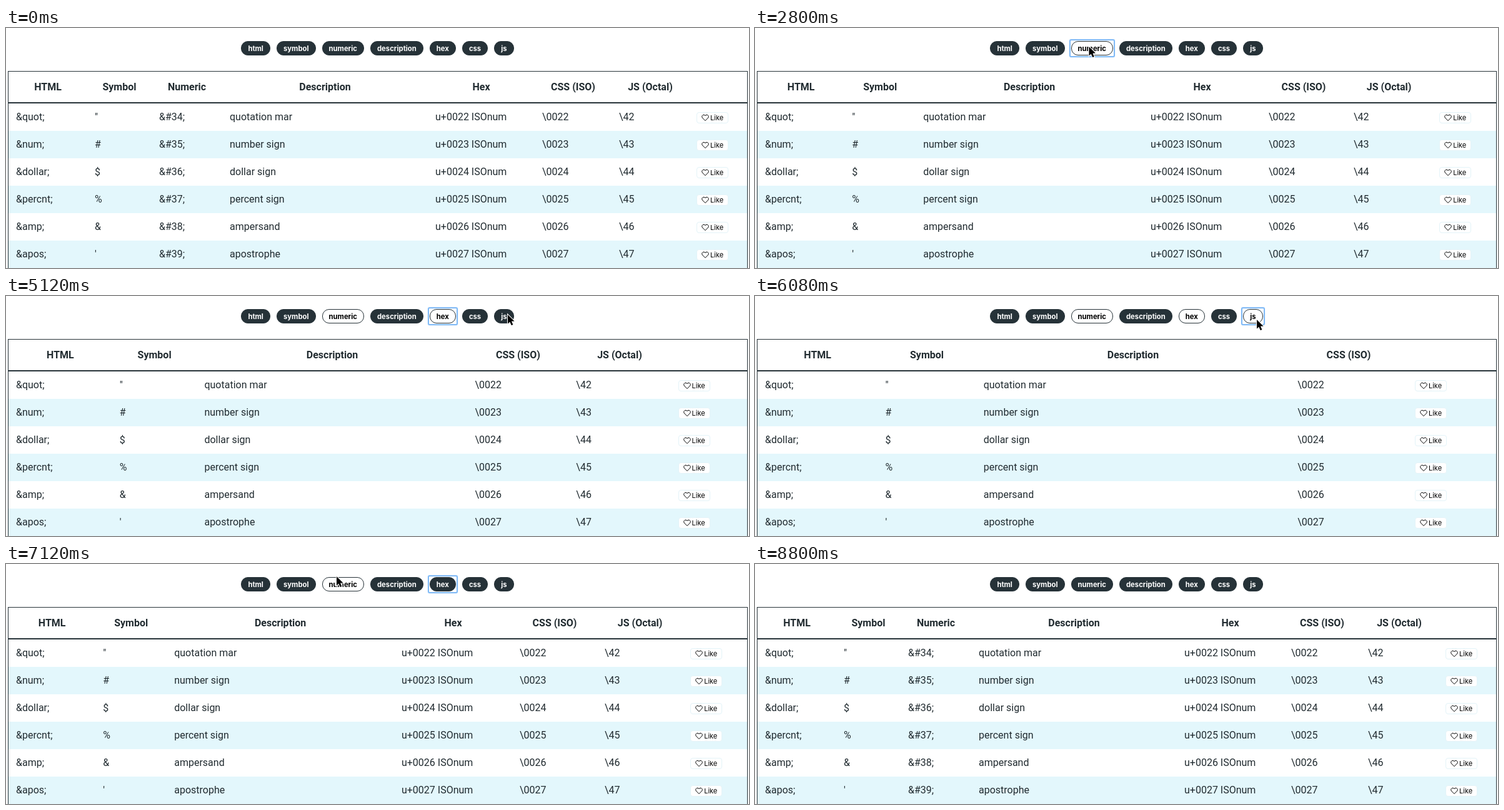
An HTML page for the animation above (8880 ms loop, 1189 by 385 pixels).

```html
<!DOCTYPE html>
<html lang="en">
<head>
<meta charset="utf-8">
<title>HTML symbols</title>
<style>
  :root { --dark: #263238; }
  html, body { margin: 0; width: 100%; height: 100%; overflow: hidden; background: #fff; }
  body { position: relative; }
  #pills { position: absolute; top: 21px; width: 100%; display: flex; justify-content: center; gap: 10px; }
  .pill {
    position: relative; box-sizing: border-box; height: 23px; padding: 0 10px;
    border: 1px solid var(--dark); border-radius: 11px; background: var(--dark); color: #fff;
    font: 700 11.3px/22px Inter, sans-serif;
  }
  .off { background: #fff; color: #000; }
  .focus::after {
    content: ''; position: absolute; inset: -4px; border: 2px solid #7fb9f6;
    border-radius: 3px; box-shadow: 0 0 1px #7fb9f6;
  }
  #table {
    position: absolute; left: 3px; top: 69px; width: 1182px; border: 1px solid var(--dark);
    font: 16px/44px Roboto, sans-serif; color: #212b30;
  }
  .row { display: grid; height: 44px; white-space: pre; }
  .row:nth-child(odd) { background: #e3f7fc; }
  .row span { padding-left: 12px; }
  .row.head {
    height: 49px; line-height: 49px; border-bottom: 2px solid var(--dark);
    background: none; font-weight: 700; text-align: center;
  }
  .head span { padding: 0; }
  .like {
    box-sizing: border-box; width: 51px; height: 18px; margin: 14px 0 0 12px; padding-left: 7px;
    display: flex; gap: 2px; border: 1px solid #e3f3f8; border-radius: 4px; background: #fff;
    color: #000; font: 11px/16px Inter, sans-serif;
  }
  .crisp .like { border-color: #d5dadd; }
  .like svg { margin-top: 2px; }
  #pointer { position: absolute; left: 0; top: 0; overflow: visible; }
</style>
</head>
<body>
<div id="pills"></div>
<div id="table"></div>
<svg id="pointer" width="1" height="1">
  <g id="press" fill="none">
    <circle cx="4.5" cy="8.5" r="16" stroke="#fff" stroke-width="2"/>
    <circle cx="4.5" cy="8.5" r="17" stroke="#111"/>
  </g>
  <path d="M0 0V14.5L3.3 11.4L5.8 17L8.4 15.9L6 10.4H10.6Z" stroke="#fff" stroke-width="2" paint-order="stroke"/>
</svg>
<script>
const LOOP = 8880, STEP = 80;

// label, heading, share of the table width, cell text for a character code
const pad = code => '00' + code.toString(16);
const columns = [
  ['html', 'HTML', 126, (code, entity) => `&${entity};`],
  ['symbol', 'Symbol', 103, code => String.fromCharCode(code)],
  ['numeric', 'Numeric', 113, code => `&#${code};`],
  ['description', 'Description', 329, (code, entity, text) => text],
  ['hex', 'Hex', 171, code => `u+${pad(code)} ISOnum`],
  ['css', 'CSS (ISO)', 123, code => '\\' + pad(code)],
  ['js', 'JS (Octal)', 124, code => '\\' + code.toString(8)]
];
const LIKE_SHARE = 93;
const symbols = [
  ['quot', 'quotation mar'], ['num', 'number sign'], ['dollar', 'dollar sign'],
  ['percnt', 'percent sign'], ['amp', 'ampersand'], ['apos', 'apostrophe']
];

const clicks = [[2560, 'numeric'], [4240, 'hex'], [5360, 'js'], [6160, 'js'], [6640, 'hex'], [7440, 'numeric']];
// Pointer moves: start, end, x, y
const moves = [
  [1040, 1600, 531, 30], [2720, 3680, 706, 30], [4400, 5040, 803, 30], [5200, 5440, 803, 38],
  [6240, 6560, 703, 31], [6720, 7120, 529, 20], [7520, 7760, 533, -30]
];

const $ = id => document.getElementById(id);
const span = s => `<span>${s.replace(/&/g, '&amp;')}</span>`;
const like = `<div class="like"><svg width="12" height="12" fill="none" stroke="#000">
  <path d="M6 10.7L1.4 6C-.9 3.3 3 -.8 6 2.6C9 -.8 12.9 3.3 10.6 6Z"/></svg>Like</div>`;

function draw(hidden, focus) {
  $('pills').innerHTML = columns.map(([name]) =>
    `<div class="pill ${hidden.has(name) ? 'off' : ''} ${name === focus ? 'focus' : ''}">${name}</div>`).join('');

  const visible = columns.filter(([name]) => !hidden.has(name));
  const shares = [...visible.map(col => col[2]), LIKE_SHARE];
  const grid = shares.map(share => `minmax(0, ${share}fr)`).join(' ');
  const row = (kind, content) => `<div class="row ${kind}" style="grid-template-columns: ${grid}">${content}</div>`;
  const body = symbols.map((symbol, i) =>
    row('', visible.map(col => span(col[3](34 + i, ...symbol))).join('') + like));
  $('table').innerHTML = row('head', visible.map(col => span(col[1])).join('')) + body.join('');
}

function pointerAt(t) {
  let x = 985, y = 0;
  for (const [start, end, toX, toY] of moves) {
    const u = Math.min(1, Math.max(0, (t - start) / (end - start)));
    const ease = u * u * (3 - 2 * u);
    x += (toX - x) * ease;
    y += (toY - y) * ease;
  }
  return [x, y];
}

let last = '';
function render() {
  const t = Math.floor(performance.now() % LOOP / STEP) * STEP;
  const hidden = new Set();
  let focus = '', pressed = t >= 1680 && t < 2000;
  for (const [time, name] of clicks) {
    if (t < time) break;
    focus = name;
    if (t < time + STEP) pressed = true;
    else if (!hidden.delete(name)) hidden.add(name);
  }
  if (t >= 8800) focus = '';
  const state = [...hidden, focus].join();
  if (state !== last) draw(hidden, focus);
  last = state;

  $('table').className = t >= 4000 && t < 4320 ? 'crisp' : '';
  $('pointer').style.display = t >= 1040 && t < 7760 ? '' : 'none';
  $('pointer').style.transform = `translate(${pointerAt(t).map(v => v + 'px')})`;
  $('press').style.display = pressed ? '' : 'none';
  requestAnimationFrame(render);
}
draw(new Set(), '');
render();
</script>
</body>
</html>
```
